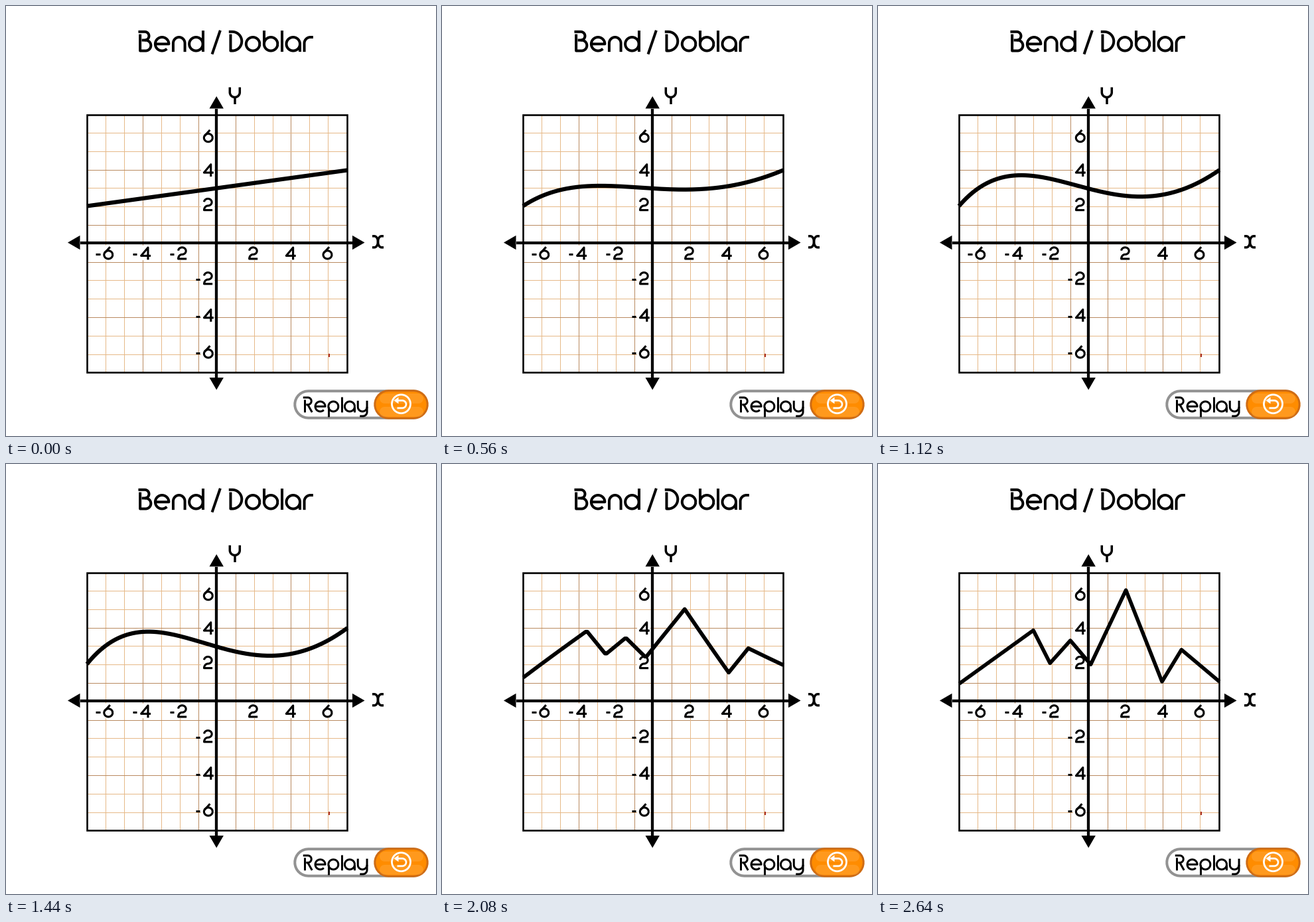
A matplotlib script that plays this animation: 648 px wide and 648 px high, repeating every 2720 ms.

```python
import numpy as np
import matplotlib.pyplot as plt
from matplotlib.animation import FuncAnimation
from matplotlib.patches import Circle, Polygon, Rectangle

SIZE, STEP, FRAMES = 648, 80, 34
LEFT, RIGHT, TOP, BOTTOM = 121.5, 514, 163.5, 551.5
BEND_END, BREAK_START, BREAK_TIME = 12, 17, 13

plt.rcParams["toolbar"] = "None"
fig = plt.figure(figsize=(SIZE / 72, SIZE / 72), dpi=72, facecolor="white")
ax = fig.add_axes([0, 0, 1, 1])
ax.set(xlim=(0, SIZE), ylim=(SIZE, 0))
ax.axis("off")


def grid_x(v):
    return 317.8 + 27.9 * v


def grid_y(v):
    return 357.7 - 27.8 * v


def stroke(points, width, color="black", cap="butt", z=3, alpha=1):
    xs, ys = np.asarray(points, float).T
    return ax.plot(xs, ys, color=color, lw=width, zorder=z, alpha=alpha,
                   solid_capstyle=cap, solid_joinstyle="round")[0]


def pill(x0, x1, y, height, color, z, alpha=1):
    r = height / 2
    stroke([(x0 + r, y), (x1 - r, y)], height, color, "round", z, alpha)


# Lettering: round strokes in units of the x-height, baseline at 0, y upwards.
def arc(cx, cy, rx, ry, a0, a1):
    a = np.radians(np.linspace(a0, a1, 40))
    return np.column_stack([cx + rx * np.cos(a), cy + ry * np.sin(a)])


def join(*parts):
    return np.vstack([np.atleast_2d(p) for p in parts])


CAP, ASC, DROP, GAP = 1.4, 1.48, -.08, .32
RING = arc(.5, .5, .5, .5, 0, 360)
GLYPHS = {
    "B": [join((-.05, CAP), (.42, CAP), arc(.42, 1.09, .31, .31, 90, -90), (.2, .78)),
          join((.42, .78), arc(.48, .39, .39, .39, 90, -90), (.08, 0), (.08, 1.22))],
    "D": [join((-.05, CAP), (.2, CAP), arc(.2, .7, .7, .7, 90, -90), (.08, 0), (.08, 1.22))],
    "R": [join((-.05, CAP), (.42, CAP), arc(.42, 1.04, .36, .36, 90, -90), (.25, .68)),
          join((.42, .68), (.85, DROP)), join((.08, 1.22), (.08, DROP))],
    "Y": [join((0, 1.5), arc(.5, 1, .5, .5, 180, 360), (1, 1.5)), join((.5, .5), (.5, -.2))],
    "x": [join((0, 1), arc(.18, .5, .32, .5, 90, -90), (0, 0)),
          join((1, 1), arc(.82, .5, .32, .5, 90, 270), (1, 0))],
    "e": [join((.1, .5), arc(.5, .5, .5, .5, 0, 315))],
    "n": [join((0, DROP), arc(.43, .55, .43, .45, 180, 0), (.86, DROP))],
    "d": [RING, join((1, ASC), (1, DROP))],
    "b": [RING, join((0, ASC), (0, .5))],
    "o": [RING],
    "l": [join((0, ASC), (0, DROP))],
    "a": [RING, join((1, .5), (1, DROP))],
    "r": [join((0, DROP), arc(.45, .55, .45, .45, 180, 90), (.65, 1))],
    "p": [RING, join((0, .5), (0, -.5))],
    "y": [join((0, 1.08), arc(.46, .46, .46, .46, 180, 360)),
          join((.92, 1.08), arc(.5, -.05, .42, .42, 0, -90), (.2, -.47))],
    "/": [join((0, -.25), (.6, 1.5))],
    " ": [join((0, 0), (.04, 0))],
    "-": [join((0, .4), (.36, .4))],
    "2": [join(arc(.4, .7, .34, .31, 175, -90), arc(.4, 0, .34, .39, 90, 180), (.8, 0))],
    "4": [join((.9, .27), (.05, .27), (.66, 1), (.66, DROP))],
    "6": [arc(.43, .36, .38, .36, 0, 360), join((.58, 1.05), (.1, .52))],
}


def write(text, x, base, scale, width):
    for ch in text:
        parts = GLYPHS[ch]
        if ch != " ":
            for part in parts:
                stroke(part * (scale, -scale) + (x, base), width)
        x += scale * (max(part[:, 0].max() for part in parts) + GAP)


def draw_grid():
    for k in range(-6, 7):
        if k == 0:
            continue
        color = "#b98a60" if abs(k) % 3 == 1 else "#e6b988"
        stroke([(grid_x(k), TOP), (grid_x(k), BOTTOM)], 1, color, z=1)
        stroke([(LEFT, grid_y(k)), (RIGHT, grid_y(k))], 1, color, z=1)
    ax.add_patch(Rectangle((LEFT, TOP), RIGHT - LEFT, BOTTOM - TOP, fill=False, lw=2.6, zorder=3))
    ax.add_patch(Rectangle((485.7, 523.5), 2.6, 5, color="#a8281c", lw=0, zorder=3))


def arrow(start, tip):
    start, tip = np.array(start), np.array(tip)
    ahead = (tip - start) / np.linalg.norm(tip - start)
    side = ahead[::-1] * 10.7
    back = tip - 18.5 * ahead
    stroke([start, back], 4.3)
    ax.add_patch(Polygon([tip, back + side, back - side], color="black", lw=0, zorder=3))


def draw_axes():
    middle = (317.2, 356.5)
    for tip in [(93, 356.5), (540.5, 356.5), (317.2, 136), (317.2, 578.5)]:
        arrow(middle, tip)
    write("Y", 337.3, 145, 15, 3.5)
    write("x", 552, 363.8, 17, 3.5)


def tick(text, x, base):
    """Write a number with its digit's left edge at x, on a white patch."""
    ax.add_patch(Rectangle((x - 4, base - 20), 20, 22, color="white", lw=0, zorder=2))
    write(text, x - 11.5 * (len(text) - 1), base, 17, 3.1)


def draw_ticks():
    for v in (-6, -4, -2, 2, 4, 6):
        room = 2.5 if v < 0 else -2
        tick(str(v), grid_x(v) - 6 + room, 381)
        tick(str(v), 297.5, grid_y(v) + max(2.3 * v, 5.5))


def draw_button():
    y = 600.3
    pill(432.5, 635, y, 44.5, "#929292", 2)
    pill(437, 630, y, 36.5, "white", 2)
    write("Replay", 448.5, 611, 15, 3)
    pill(553.5, 636, y, 44.5, "#cf6c14", 4)
    pill(556.5, 633, y, 38.5, "#ff8c00", 4)
    for offset in (-9, 11):
        pill(562, 628, y + offset, 15, "#ffb455", 5, .35)
    ax.add_patch(Circle((595.5, 599.7), 14, fill=False, ec="white", lw=2.8, zorder=6))
    turn = join((589, 594.5), arc(597, 600.2, 6, 5.7, -90, 90), (589.5, 605.9))
    stroke(turn, 2.7, "white", z=6)
    ax.add_patch(Polygon([(584.5, 594.5), (591.5, 589.5), (591.5, 599.5)], color="white", lw=0, zorder=6))


# The moving line: straight, then bent, then broken into a zigzag.
PEAK_X = grid_x(np.array([-7, -3, -2.1, -1, .1, 2, 3.95, 5, 7.05]))
PEAK_Y = grid_y(np.array([.96, 3.85, 2.07, 3.3, 2, 6.03, 1.07, 2.8, 1.07]))
FROM_X = grid_x(np.array([-7, -4.9, -3.54, -2.52, -1.5, 1.08, 4.42, 5.5, 7.05]))
BLUNT = np.array([0, 1, 1, 1, 1, 0, 0, 0, 0])
HELD = (2, 3, 13)


def bent(x, k=1):
    u = (x - 318) / 196
    return 274.5 - 27 * u + k * (1 - u**2) * (1 + 83 * u - 26 * u**2)


def bent_line(k):
    x = np.linspace(122, 514.5, 150)
    return x, bent(x, k)


def doubled(x, half):
    """Split each blunt corner into two, spread by half on either side."""
    return np.concatenate([[a - half, a + half] if b else [a] for a, b in zip(x, BLUNT)])


def broken_line(t):
    x = doubled(FROM_X * (1 - t) + PEAK_X * t, 13 * (1 - t) ** 2)
    y = np.repeat(bent(FROM_X) * (1 - t) + PEAK_Y * t, BLUNT + 1)
    origin = doubled(FROM_X, 8)
    at = np.arange(len(x))
    fine = np.linspace(0, len(x) - 1, 12 * (len(x) - 1) + 1)
    old = np.interp(fine, at, origin)
    bulge = bent(old) - np.interp(fine, at, bent(origin))
    return np.interp(fine, at, x), np.interp(fine, at, y) + bulge * (1 - t) ** 2


def update(n):
    t = min((n - BREAK_START) / BREAK_TIME, 1) if n > BREAK_START + 1 else 0
    if t > 0:
        line.set_data(*broken_line(t))
    else:
        u = min((n - sum(n >= h for h in HELD)) / BEND_END, 1)
        line.set_data(*bent_line(u * (1 + .22 * (1 - u))))
    line.set_linewidth(6.2 - .6 * t)
    return line,


draw_grid()
draw_axes()
draw_ticks()
draw_button()
write("Bend / Doblar", 200.5, 67.5, 20.5, 4)
line = stroke(np.column_stack(bent_line(0)), 6.2, z=4)

anim = FuncAnimation(fig, update, frames=FRAMES, interval=STEP, repeat=True, repeat_delay=0)
plt.show()
```
